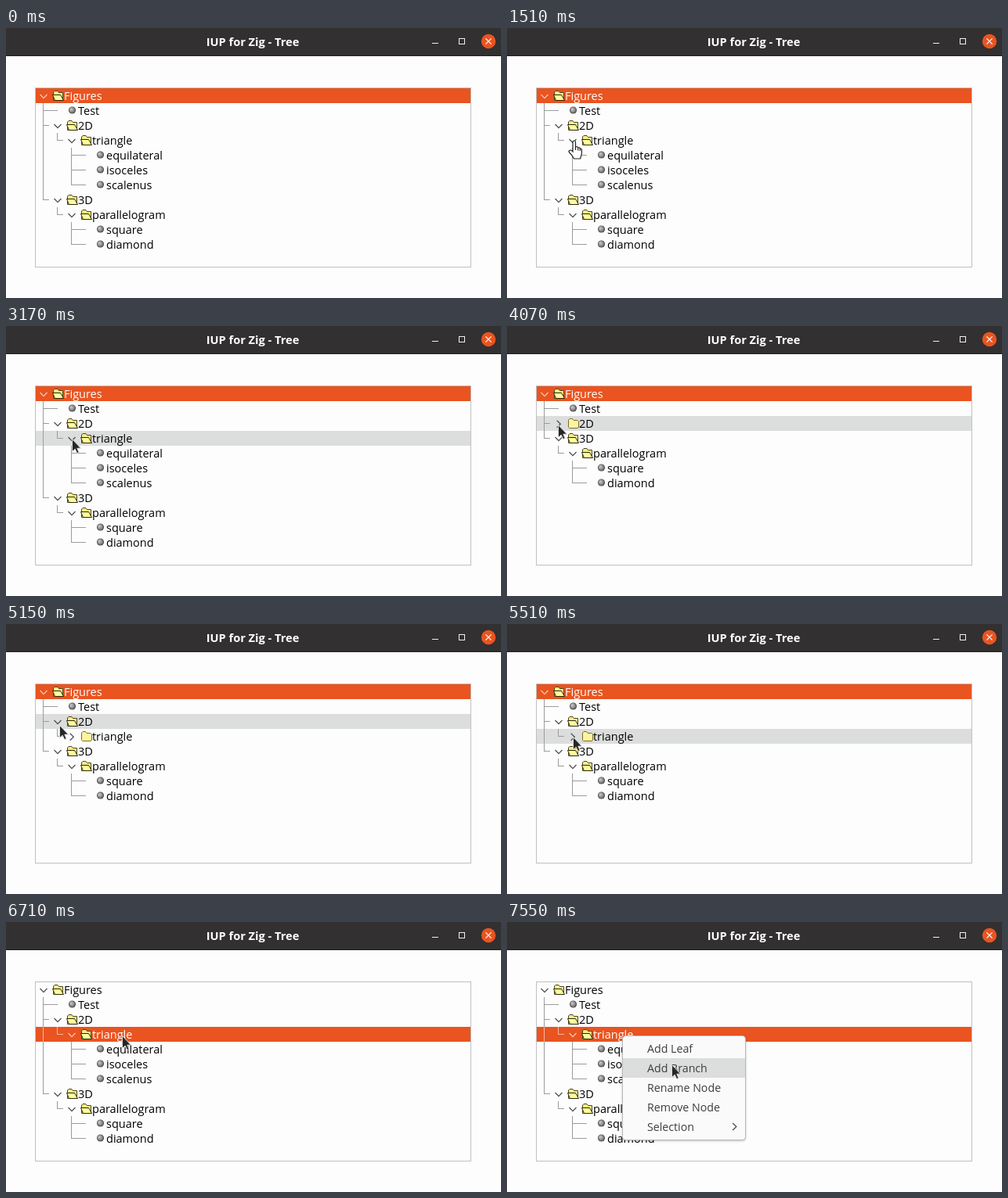
Write an HTML page with a canvas that moves like this. It is 632 px wide and 345 px high and loops after 8 s.

```html
<!DOCTYPE html>
<html lang="en">
<head>
<meta charset="utf-8">
<title>Tree</title>
<style>
html, body { margin: 0; height: 100%; overflow: hidden; background: #fdfdfd; }
canvas { display: block; }
</style>
</head>
<body>
<canvas id="stage" width="632" height="345"></canvas>
<script>
const ctx = document.getElementById('stage').getContext('2d');
const LOOP = 8000, ROW = 19, TOP = 77, STEP = 18, MENU_ROW = 25, MENU_TOP = 149;
const ORANGE = '#e95420', HOVER = '#dcdddd', FAMILY = '"Open Sans", "Noto Sans", sans-serif';

// Event times in ms
const ARROW = 1790, SELECT = 6710, MENU = 7100, MENU_HOVER = 7330;

const tree = ['Figures', [
  ['Test'],
  ['2D', [['triangle', [['equilateral'], ['isoceles'], ['scalenus']]]]],
  ['3D', [['parallelogram', [['square'], ['diamond']]]]]
]];
const menu = ['Add Leaf', 'Add Branch', 'Rename Node', 'Remove Node', 'Selection'];

// Each move goes on from the last place, along a curve bent towards "via"
const origin = [658, 333];
const moves = [
  { start: 690, end: 1430, steps: 11, via: [-80, 70], to: [84, 146] },
  { start: 1510, end: 1650, steps: 3, via: [84, 142], to: [84, 146] },
  { start: 2250, end: 2330, steps: 2, via: [84, 141], to: [84, 144] },
  { start: 3400, end: 3840, steps: 7, via: [73, 134], to: [65, 126] },
  { start: 5150, end: 5510, steps: 6, via: [75, 136], to: [84, 144] },
  { start: 5900, end: 6480, steps: 9, via: [120, 168], to: [148, 145] },
  { start: MENU_HOVER, end: 7550, steps: 4, via: [184, 166], to: [210, 182] }
];

const shapes = {
  arrow: new Path2D('M.5 .5V16.5L4.2 13.2L6.7 18.6L9.2 17.5L6.8 12.2H11.6Z'),
  hand: new Path2D('M6 14V3Q6 1 7.7 1T9.5 3V9Q12 8 12.7 10Q15 9.2 15.3 11Q17.4 10.8 17.4 13V17' +
    'Q17 20 15.5 24H7.5Q5.5 19.5 1.5 16Q.4 14.3 2 13.2Q4 12.4 6 15ZM9.5 9V13M12.7 10V13.5M15.3 11V14'),
  folderBack: new Path2D('M1.5 12.5V2L3 .5H7L8.5 2.5H13.5V12.5Z'),
  folderFront: new Path2D('M.5 5.5H10.5L14.5 12.5H3.5Z'),
  folderClosed: new Path2D('M.5 11.5V2L2 .5H5.5L7 2.5H12L13.5 4V11L12.5 12.5H1.5Z')
};

function rect(color, x, y, w, h) {
  ctx.fillStyle = color;
  ctx.fillRect(x, y, w, h);
}

function disc(fill, x, y, r) {
  ctx.fillStyle = fill;
  ctx.beginPath();
  ctx.arc(x, y, r, 0, 7);
  ctx.fill();
}

function frameRect(color, x, y, w, h) {
  ctx.strokeStyle = color;
  ctx.lineWidth = 1;
  ctx.strokeRect(x, y, w, h);
}

function label(text, x, y, color, size, weight = 500) {
  ctx.font = `${weight} ${size}px ${FAMILY}`;
  ctx.fillStyle = color;
  ctx.fillText(text, x, y);
}

function line(color, width, points) {
  ctx.beginPath();
  points.forEach(([x, y]) => ctx.lineTo(x, y));
  ctx.strokeStyle = color;
  ctx.lineWidth = width;
  ctx.stroke();
}

function shape(path, x, y, fill, stroke, width = 1) {
  ctx.save();
  ctx.translate(x, y);
  ctx.fillStyle = fill;
  ctx.strokeStyle = stroke;
  ctx.lineWidth = width;
  ctx.fill(path);
  ctx.stroke(path);
  ctx.restore();
}

function pointer(t) {
  let pos = origin;
  for (const { start, end, steps, via, to } of moves) {
    if (t < start) break;
    const tick = (end - start) / (steps - 1);
    const p = Math.min(Math.floor((t - start) / tick + 1e-6) + 1, steps) / steps, q = 1 - p;
    pos = pos.map((from, i) => Math.round(q * q * from + 2 * p * q * via[i] + p * p * to[i]));
  }
  return pos;
}

function isOpen(name, t) {
  if (name === '2D') return t < 4070 || t >= 4610;
  if (name === 'triangle') return t < 2560 || (t >= 3170 && t < 4070) || t >= 5670;
  return true;
}

// Flattens the visible nodes; trail tells for each level whether it ends there
function visible([name, kids], t, trail = []) {
  const open = isOpen(name, t);
  const rows = [{ name, open, trail, branch: !!kids }];
  if (kids && open) kids.forEach((kid, i) =>
    rows.push(...visible(kid, t, [...trail, i === kids.length - 1])));
  return rows;
}

function drawFolder(x, y, open) {
  if (open) {
    shape(shapes.folderBack, x, y, '#f4ec86', '#4a461c');
    shape(shapes.folderFront, x, y, '#ffff9c', '#2a2810');
  } else {
    shape(shapes.folderClosed, x + 1, y, '#fff3a0', '#77702c');
  }
}

function drawBullet(x, y) {
  const shade = ctx.createRadialGradient(x - 1.5, y - 1.5, 0, x, y, 4.8);
  shade.addColorStop(0, '#d0d0d0');
  shade.addColorStop(.6, '#8c8c8c');
  shade.addColorStop(1, '#3c3c3c');
  disc(shade, x, y, 4.6);
}

function chevron(x, y, down, color) {
  const points = [[-4.5, -2.3], [0, 2.3], [4.5, -2.3]];
  line(color, 1.2, points.map(([a, b]) => down ? [x + a, y + b] : [x + b, y + a]));
}

function drawRow({ name, open, trail, branch }, y, selected) {
  const depth = trail.length, dx = depth * STEP;
  const rule = selected ? '#f4b79f' : '#9c9c9c';
  trail.forEach((last, level) => {
    const x = 47 + level * STEP, own = level === depth - 1;
    if (own || !last) rect(rule, x, y, 1, own && last ? 10 : ROW);
    if (own) rect(rule, x, y + 9, branch ? 8 : 19, 1);
  });
  if (branch) {
    chevron(48 + dx, y + 10.3, open, selected ? '#f8cbb9' : '#4a4a4a');
    drawFolder(59 + dx, y + 3, open);
  } else {
    drawBullet(66.5 + dx, y + 9);
  }
  label(name, 74 + dx, y + 15, selected ? '#fff' : '#000', 14.5);
}

function drawWindow() {
  rect('#fdfdfd', 0, 0, 632, 345);
  rect('#323031', 0, 0, 632, 36);
  rect('#1f1d1e', 0, 35, 632, 1);
  ctx.textAlign = 'center';
  label('IUP for Zig - Tree', 315, 23, '#fff', 14.6, 700);
  ctx.textAlign = 'left';
  rect('#f2f2f2', 544, 19, 8, 1);
  frameRect('#f2f2f2', 578.5, 13.5, 7, 7);
  disc(ORANGE, 616, 17, 9.2);
  for (const s of [-3.6, 3.6]) line('#fff', 1.2, [[616 - s, 13.4], [616 + s, 20.6]]);
  frameRect('#c0c0c0', 37.5, 76.5, 556, 229);
}

function drawMenu(hover) {
  ctx.save();
  ctx.shadowColor = 'rgba(0,0,0,.3)';
  ctx.shadowBlur = 3;
  ctx.shadowOffsetY = 1;
  ctx.fillStyle = '#fafafa';
  ctx.beginPath();
  ctx.roundRect(147.5, 145.5, 157, 133, 4);
  ctx.fill();
  ctx.restore();
  ctx.strokeStyle = '#b8b8b8';
  ctx.lineWidth = 1;
  ctx.stroke();
  menu.forEach((item, i) => {
    const y = MENU_TOP + i * MENU_ROW;
    if (i === hover) rect(HOVER, 148, y, 156, MENU_ROW);
    label(item, 179, y + 18, '#3d3d3d', 14.2);
  });
  chevron(290.5, 261.5, false, '#4a4a4a');
}

function draw(t) {
  const [x, y] = pointer(t);
  const selected = t < SELECT ? 0 : 3;
  const hover = t < ARROW ? -1 : t < MENU ? Math.floor((y - TOP) / ROW) : selected;

  drawWindow();
  visible(tree, t).forEach((row, i) => {
    const top = TOP + i * ROW;
    if (i === selected || i === hover) rect(i === selected ? ORANGE : HOVER, 38, top, 555, ROW);
    drawRow(row, top, i === selected);
  });
  if (t >= MENU) drawMenu(t < MENU_HOVER ? -1 : Math.floor((y - MENU_TOP) / MENU_ROW));
  if (t < ARROW) shape(shapes.hand, x - 6, y - 1, '#fff', '#222', 1.2);
  else shape(shapes.arrow, x, y, '#262626', '#e8e8e8', .9);
}

function frame() {
  draw(performance.now() % LOOP);
  requestAnimationFrame(frame);
}
frame();
</script>
</body>
</html>
```
